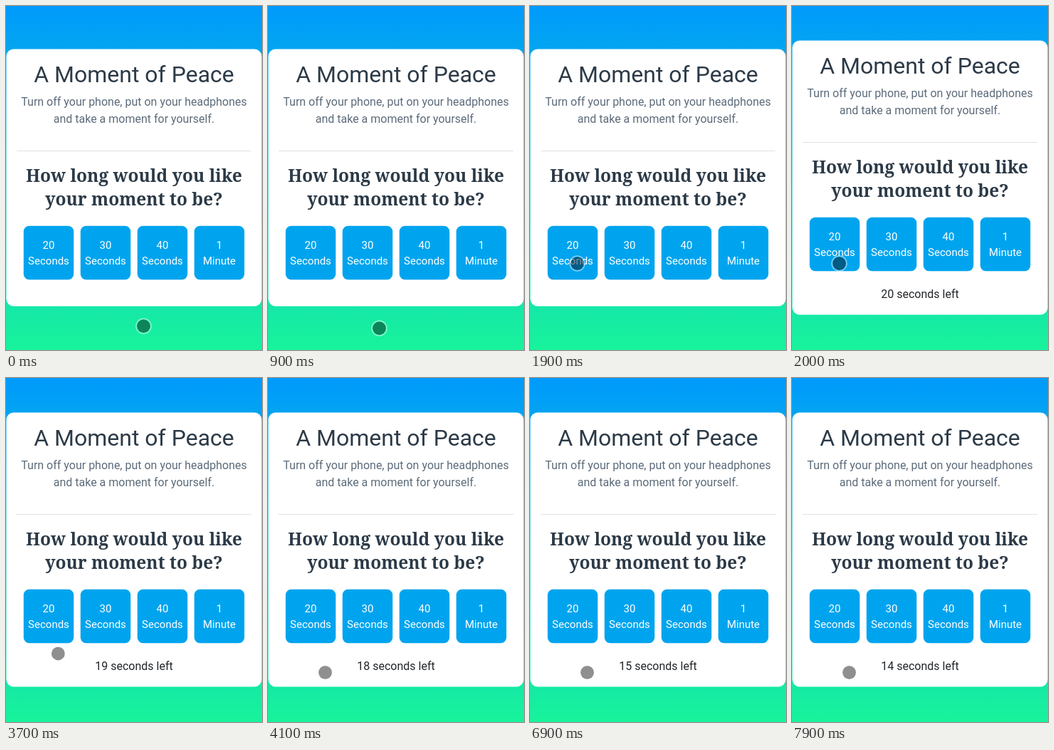
These frames come from a looping animation (360 by 483 pixels, 8000 ms). An HTML page:

```html
<!DOCTYPE html>
<html lang="en">
<head>
<meta charset="utf-8">
<title>A Moment of Peace</title>
<style>
html, body { margin: 0; width: 100%; height: 100%; overflow: hidden; }
svg { display: block; width: 360px; height: 483px; font-family: Roboto, sans-serif; text-anchor: middle; }
.title { font-size: 32px; fill: #2c3a47; }
.intro { font-size: 16px; fill: #5c6b7a; }
.ask { font: bold 24.5px "Noto Serif", serif; fill: #2c3a47; }
.label { font-size: 15px; fill: #fff; }
.left { font-size: 16px; fill: #212529; }
</style>
</head>
<body>
<svg viewBox="0 0 360 483">
  <defs>
    <linearGradient id="sky" x2="0" y2="1">
      <stop stop-color="#009afc"/>
      <stop offset="1" stop-color="#18f39b"/>
    </linearGradient>
  </defs>
  <rect width="360" height="483" fill="url(#sky)"/>
  <rect id="card" x=".5" width="359" rx="10" fill="#fff"/>
  <g id="content">
    <text class="title" x="180" y="107">A Moment of Peace</text>
    <text class="intro" x="180" y="140">Turn off your phone, put on your headphones</text>
    <text class="intro" x="180" y="164">and take a moment for yourself.</text>
    <rect x="15" y="203" width="330" height="1" fill="#dfe1e3"/>
    <text class="ask" x="180" y="247">How long would you like</text>
    <text class="ask" x="180" y="280">your moment to be?</text>
    <g id="buttons"></g>
  </g>
  <text class="left" id="left" x="180" y="410"></text>
  <g id="pointer">
    <circle r="9.5" fill="#000" fill-opacity=".44"/>
    <circle r="10.4" fill="none" stroke="#fff" stroke-opacity=".45" stroke-width="1.8"/>
  </g>
</svg>
<script>
const LOOP = 8000, STEP = 100, OPEN = 2000, SECONDS = 20;
const $ = id => document.getElementById(id);
const easeOut = p => 1 - (1 - p) ** 3;

// pointer moves: start, duration, end point
const home = [193.5, 449.5];
const moves = [
  [400, 300, 168.5, 452.5],
  [800, 100, 156.5, 452.5],
  [900, 300, 96.5, 408.5],
  [1300, 400, 66.5, 361.5],
  [3600, 500, 80.5, 413.5]
];

function pointerAt(t) {
  let [x, y] = home;
  for (const [start, length, toX, toY] of moves) {
    const p = easeOut(Math.min(1, Math.max(0, (t - start) / length)));
    x += (toX - x) * p;
    y += (toY - y) * p;
  }
  return `${x} ${y}`;
}

$('buttons').innerHTML = ['20 Seconds', '30 Seconds', '40 Seconds', '1 Minute'].map((name, i) => {
  const [count, unit] = name.split(' ');
  return `<g transform="translate(${25 + i * 80} 309)">
    <rect x="-.25" y="-.25" width="70.5" height="75.5" rx="8" fill="#00a4ee"/>
    <text class="label" x="35" y="32">${count}</text>
    <text class="label" x="35" y="54">${unit}</text></g>`;
}).join('');

function draw(t) {
  const open = t >= OPEN, lift = open ? 12 : 0;
  const gone = Math.floor((t - OPEN + STEP) / 1000);
  $('card').setAttribute('y', 60.5 - lift);
  $('card').setAttribute('height', 361 + 2 * lift);
  $('content').setAttribute('transform', `translate(0 ${-lift})`);
  $('left').textContent = open ? `${SECONDS - gone} seconds left` : '';
  $('pointer').setAttribute('transform', `translate(${pointerAt(t)})`);
}

function frame() {
  const t = performance.now() % LOOP;
  draw(t - t % STEP);
  requestAnimationFrame(frame);
}
frame();
</script>
</body>
</html>
```
